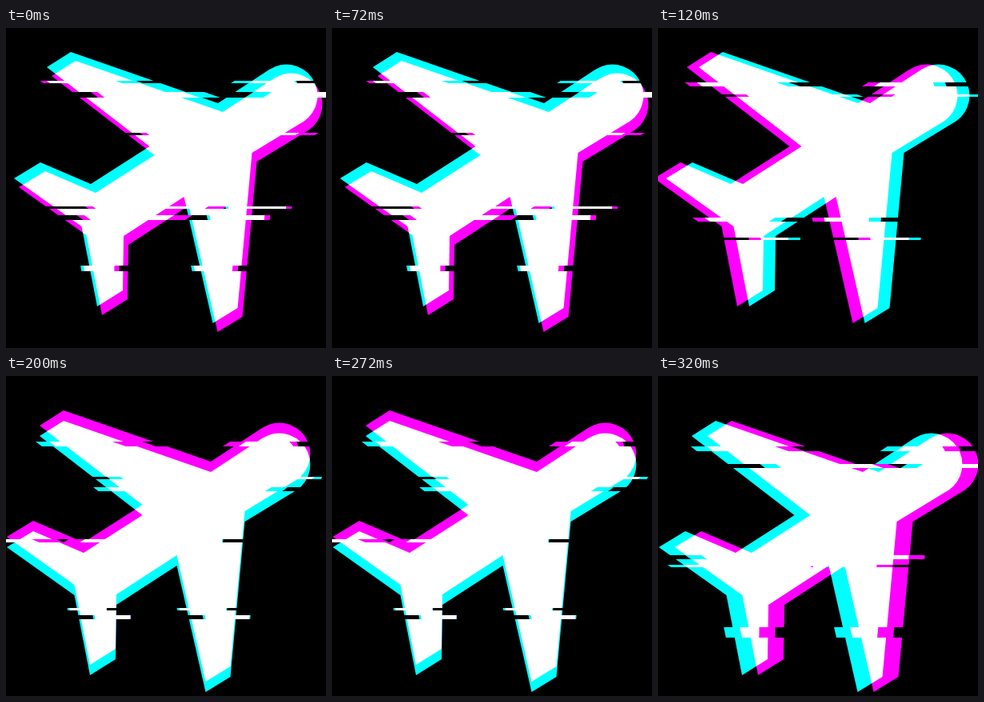
An HTML page with a canvas that plays this animation: 400x400 px, repeating every 360 ms.

```html
<!DOCTYPE html>
<html lang="en">
<head>
<meta charset="utf-8">
<title>Glitch plane</title>
<style>
  html, body { margin: 0; width: 100%; height: 100%; overflow: hidden; background: #000; }
  canvas { display: block; width: 400px; height: 400px; }
</style>
</head>
<body>
<canvas id="stage" width="400" height="400"></canvas>
<script>
const ctx = document.getElementById('stage').getContext('2d');
const SIZE = 400;

const plane = new Path2D(`M81 30 L265 94 L329 52 A38.9 38.9 0 0 1 372.5 116.5
  L307.5 156 L289.5 350 L258.5 369 L222.5 211 L147 260 L146 328 L114 348
  L94.5 248 L10 188 L43 168 L106 195 L179.5 148 L51 49 Z`);

// Each pose: layer offsets [x, y] and displaced bands [top, bottom, shift].
const poses = [
  { until: 120, cyan: [0, 0], magenta: [6, 11],
    bands: [[66, 69, -22], [80, 87, 23], [131, 134, 18], [223, 226, 49], [234, 240, 23], [297, 304, -11]] },
  { until: 200, cyan: [0, 0], magenta: [-15, 0],
    bands: [[68, 73, -27], [83, 86, 15], [237, 242, -21], [262, 265, 31]] },
  { until: 320, cyan: [-9, 26], magenta: [-9, 13],
    bands: [[82, 88, -14], [126, 129, 18], [139, 144, -16], [204, 208, -25], [290, 293, -12], [299, 304, 18]] },
  { until: 360, cyan: [-9, 26], magenta: [11, 26],
    bands: [[88, 94, -18], [110, 115, 40], [224, 229, 19], [236, 239, -20], [314, 327, -11]] }
];
const LOOP = poses[poses.length - 1].until;

function fillPlane([x, y], color, shift) {
  ctx.save();
  ctx.translate(x + shift, y);
  ctx.fillStyle = color;
  ctx.fill(plane);
  ctx.restore();
}

function drawBand(pose, top, bottom, shift) {
  ctx.save();
  ctx.beginPath();
  ctx.rect(0, top, SIZE, bottom - top);
  ctx.clip();
  ctx.fillStyle = '#000';
  ctx.fillRect(0, top, SIZE, bottom - top);
  // Cyan and magenta add up to white where they overlap.
  ctx.globalCompositeOperation = 'lighter';
  fillPlane(pose.cyan, '#0ff', shift);
  fillPlane(pose.magenta, '#f0f', shift);
  ctx.restore();
}

function drawPose(pose) {
  drawBand(pose, 0, SIZE, 0);
  for (const band of pose.bands) drawBand(pose, ...band);
}

const start = performance.now();
function tick() {
  const time = (performance.now() - start) % LOOP;
  drawPose(poses.find(pose => time < pose.until));
  requestAnimationFrame(tick);
}
tick();
</script>
</body>
</html>
```
